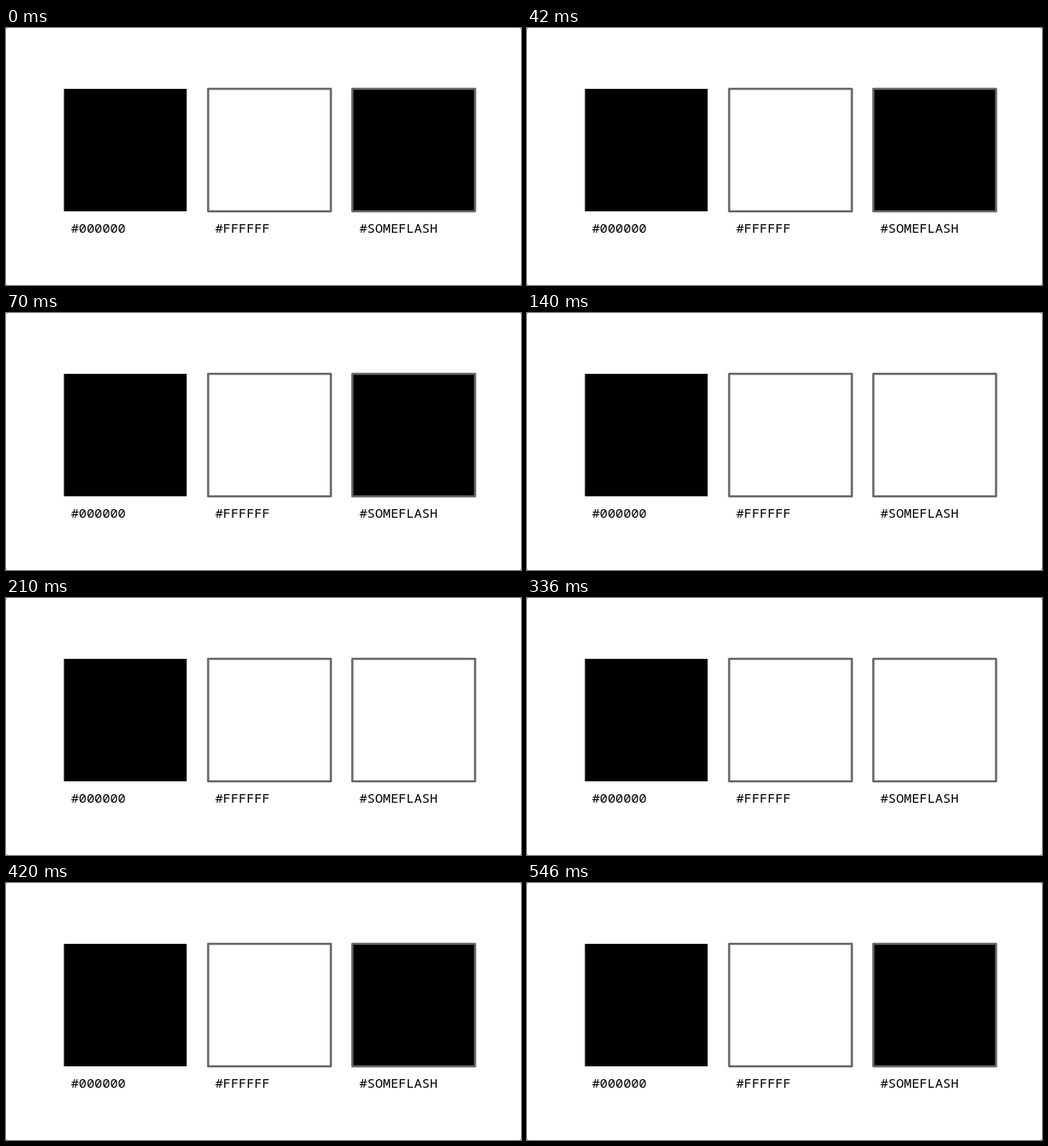
Animation, 600 px wide and 300 px high, one loop 630 ms. Source, as an HTML page:

```html
<!DOCTYPE html>
<html lang="en">
<head>
<meta charset="utf-8">
<title>Flashing swatch</title>
<style>
  html, body { margin: 0; width: 100%; height: 100%; overflow: hidden; background: #888; }
  svg { display: block; width: 100%; height: 100%; }
  text { font: 500 15.2px "Noto Sans Mono", "DejaVu Sans Mono", monospace; fill: #000; }
  .framed { stroke: #666; stroke-width: 2.5; stroke-linejoin: round; }
</style>
</head>
<body>
<svg viewBox="0 0 600 300">
  <rect width="600" height="300" rx="2" fill="#fff"/>
  <rect x="67.5" y="71" width="143" height="143"/>
  <rect class="framed" x="235.5" y="71" width="143" height="143" fill="#fff"/>
  <rect class="framed" id="flash" x="403.5" y="71" width="143" height="143"/>
  <text x="75.7" y="238.5">#000000</text>
  <text x="243.7" y="238.5">#FFFFFF</text>
  <text x="411.7" y="238.5">#SOMEFLASH</text>
</svg>
<script>
  const LOOP = 630, WHITE_FROM = 140, WHITE_UNTIL = 420;
  const flash = document.getElementById("flash");
  const start = performance.now();

  function draw(ms) {
    const t = ms % LOOP;
    const isWhite = t >= WHITE_FROM && t < WHITE_UNTIL;
    flash.setAttribute("fill", isWhite ? "#fff" : "#000");
  }

  function tick(now) {
    draw(Math.max(0, now - start));
    requestAnimationFrame(tick);
  }

  draw(0);
  requestAnimationFrame(tick);
</script>
</body>
</html>
```
